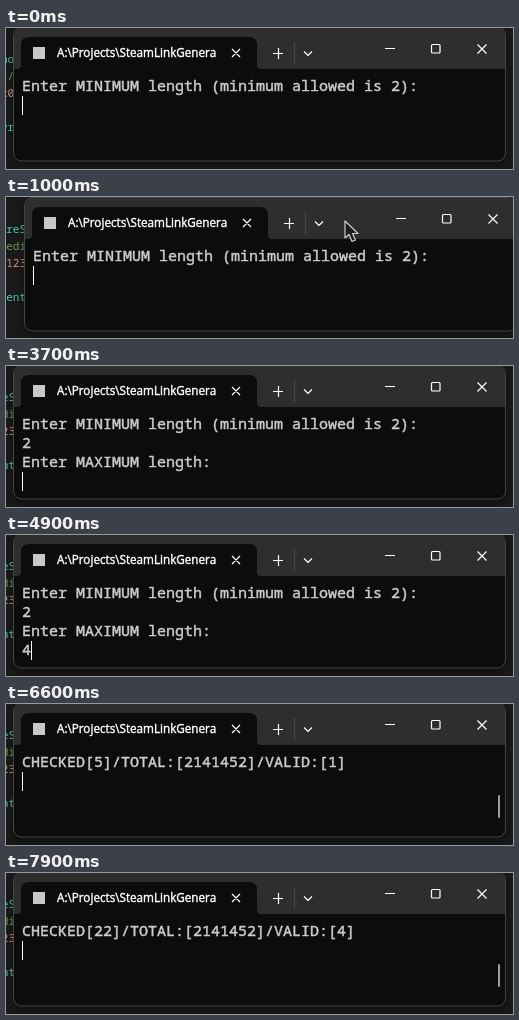
Recreate the animation shown at these times as an HTML page. Size 507 by 141 pixels, loop 8000 ms.

```html
<!DOCTYPE html>
<html lang="en">
<head>
<meta charset="utf-8">
<title>Terminal</title>
<style>
html, body { margin: 0; width: 100%; height: 100%; overflow: hidden; background: #191919; }
svg { display: block; width: 507px; height: 141px; }
text { white-space: pre; }
#code { font: 11px "Noto Sans Mono", monospace; }
#rows { font: 15px "Noto Sans Mono", monospace; fill: #ccc; stroke: #ccc; stroke-width: .45; }
#title { font: 11.7px "Open Sans", sans-serif; fill: #fff; stroke: #fff; stroke-width: .4; }
.line { fill: none; stroke: #fff; stroke-width: 1.2; }
</style>
</head>
<body>
<svg viewBox="0 0 507 141">
  <defs>
    <clipPath id="tabClip"><rect x="51" y="12" width="159" height="26"/></clipPath>
    <filter id="soft" x="-10%" y="-20%" width="120%" height="150%"><feGaussianBlur stdDeviation="4"/></filter>
  </defs>
  <rect width="507" height="141" fill="#191919"/>
  <g id="code">
    <text y="35" fill="#4ec9b0">noreS</text>
    <text y="52" fill="#6a9955">//edi</text>
    <text y="69" fill="#ce9178">x0123</text>
    <text y="103" fill="#4ec9b0">yrent</text>
  </g>
  <g id="win">
    <rect x="8" y="4" width="492" height="133" rx="8" opacity=".4" filter="url(#soft)"/>
    <rect x="8" y="0" width="491" height="133" rx="8" fill="#0c0c0c"/>
    <path d="M8 41V8a8 8 0 0 1 8-8H491a8 8 0 0 1 8 8V41z" fill="#2e2e2e"/>
    <path d="M11 41q4 0 4-4V17q0-8 8-8H243q8 0 8 8V37q0 4 4 4z" fill="#0c0c0c"/>
    <rect x="7.5" y="-.5" width="492" height="133.5" rx="8" fill="none" stroke="#444"/>
    <rect x="27" y="19" width="12" height="12" fill="#c8c8c8"/>
    <text id="title" x="51" y="29" clip-path="url(#tabClip)">A:\Projects\SteamLinkGenera</text>
    <path class="line" d="M226 21l8 8m0-8l-8 8M267 25.5h10M272.5 20v11M298 23.5l4 4 4-4"/>
    <path class="line" d="M288.5 14v22" style="stroke:#484848"/>
    <path class="line" d="M379 20.5h10M471.5 16.5l9 9m0-9l-9 9"/>
    <rect class="line" x="425.5" y="16.5" width="8.5" height="8.5" rx="1"/>
    <g id="rows">
      <text x="16" y="63"></text>
      <text x="16" y="82"></text>
      <text x="16" y="101"></text>
      <text x="16" y="120"></text>
    </g>
    <rect id="caret" width="1" height="19" fill="#fff"/>
    <rect id="bar" x="492" y="91" width="2" height="23" rx="1" fill="#9d9d9d"/>
    <path id="mouse" d="M328 23v17l4-3.5 3 7 3.5-1.5-3-6.5h5.5z" fill="#1c1c1c" stroke="#ccc" stroke-width="1.2" stroke-linejoin="round"/>
  </g>
</svg>
<script>
const $ = id => document.getElementById(id);
const rows = [...$("rows").children];

const min = "Enter MINIMUM length (minimum allowed is 2):";
const max = "Enter MAXIMUM length:";
const gen = "Generating IDs...";
const total = 2141452;

// [start, lines, caret column, caret row]; the caret is hidden without a row
const screens = [
  [0, [min], 0, 1],
  [1400, [min]],
  [2000, [min], 0, 1],
  [2500, [min]],
  [3000, [min], 0, 1],
  [3400, [min, "2"], 1, 1],
  [3700, [min, "2", max], 0, 3],
  [4200, [min, "2", max]],
  [4800, [min, "2", max], 0, 3],
  [4900, [min, "2", max, "4"], 1, 3],
  [5500, [gen], 0, 1],
  [5600, [gen, "TOTAL VARIATIONS: " + total, "Queueing IDs..."], 0, 3]
];

// [start, checked, valid]
const counts = [
  [6100, 1, 0], [6200, 2, 0], [6500, 4, 1], [6600, 5, 1], [6700, 6, 1],
  [6800, 8, 2], [6900, 10, 2], [7100, 11, 2], [7200, 13, 3], [7400, 14, 3],
  [7500, 16, 3], [7600, 17, 3], [7700, 18, 4], [7800, 20, 4], [7900, 22, 4]
];
for (const [start, checked, valid] of counts)
  screens.push([start, [`CHECKED[${checked}]/TOTAL:[${total}]/VALID:[${valid}]`], 0, 1]);

const show = (id, on) => $(id).setAttribute("visibility", on ? "visible" : "hidden");
const move = (id, x, y) => $(id).setAttribute("transform", `translate(${x} ${y})`);

function draw(now) {
  const t = Math.floor(now % 8000 / 100) * 100;

  // The view follows the dragged window, then catches up with it
  const drag = Math.min(1, Math.max(0, (t - 200) / 800));
  const lag = t < 1100 ? drag : 0;
  const x = Math.round(11 * lag), y = Math.round(lag);
  move("win", x, y);
  move("code", x - 5 - 19 * drag, y);
  show("mouse", t >= 300 && t < 1200);

  const [, lines, col, row] = screens.findLast(s => s[0] <= t);
  rows.forEach((el, i) => el.textContent = lines[i] || "");
  show("caret", row !== undefined);
  if (row !== undefined) move("caret", 16 + 9 * col, 49 + 19 * row);
  show("bar", t >= 5500);
  requestAnimationFrame(draw);
}
requestAnimationFrame(draw);
</script>
</body>
</html>
```
